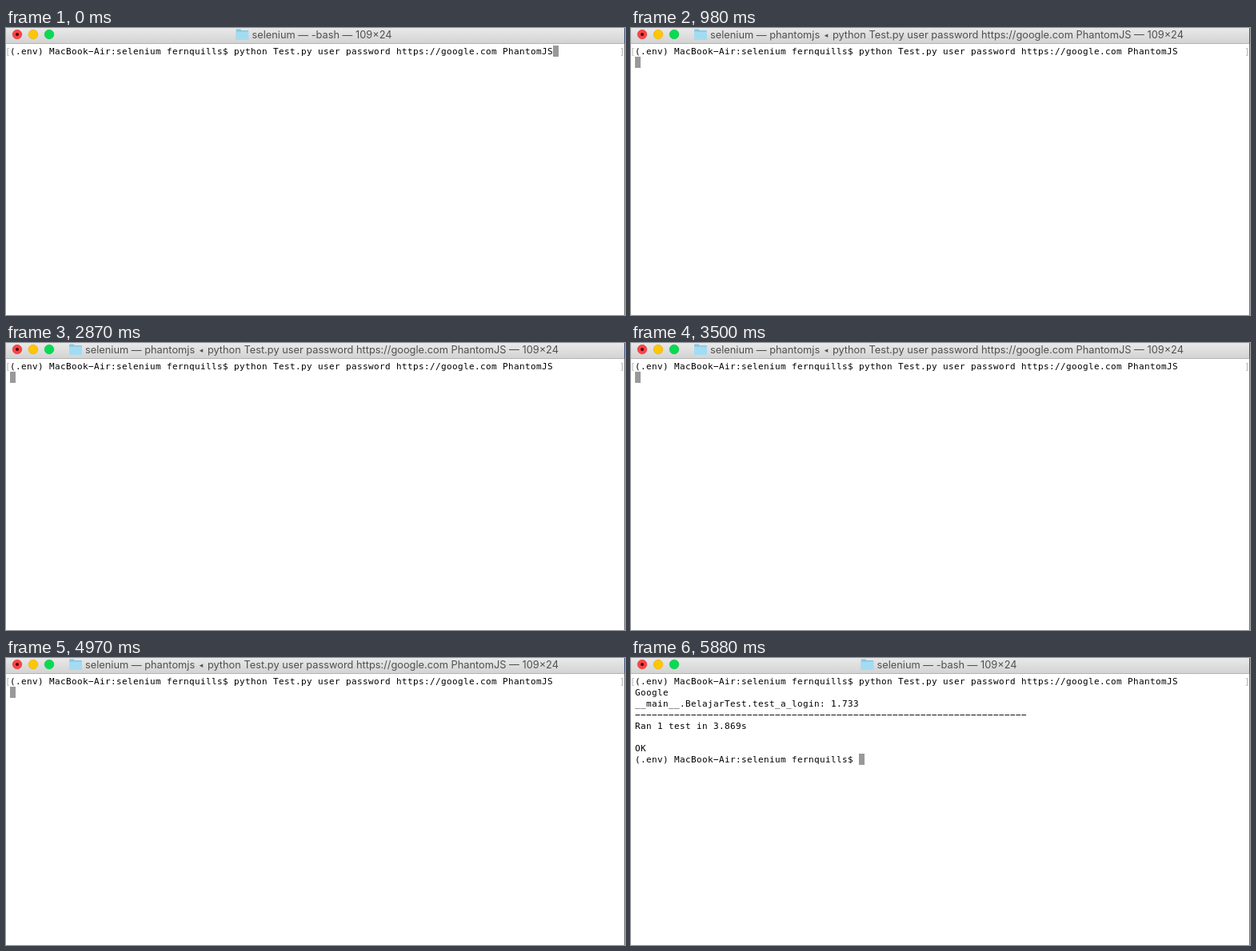
Animation of 774 by 360 pixels, one loop 6.02 s. Source, as an HTML page:

```html
<!DOCTYPE html>
<html lang="en">
<head>
<meta charset="utf-8">
<title>Terminal test run</title>
<style>
  html, body { margin: 0; width: 100%; height: 100%; overflow: hidden; background: #fff; }
  #stage { position: relative; width: 774px; height: 360px; overflow: hidden; background: #fff; }
  #stage div, #stage span, #stage svg { position: absolute; }
  #bar {
    left: 0; top: 0; width: 774px; height: 19px;
    background: linear-gradient(#e9e9e9, #d3d3d3);
    border-bottom: 1px solid #b4b4b4;
  }
  #stage #title {
    left: 385px; top: 0; padding-left: 20px; transform: translateX(-50%);
    font: 12.8px/17px Inter, sans-serif; color: #505050; white-space: pre;
  }
  #title svg { left: 0; top: 1px; }
  #stage #title b { position: static; margin: 0 2px; font: 9px/1 "DejaVu Sans", sans-serif; vertical-align: 1px; }
  #stage #caption { position: static; }
  .row, .mark {
    font: 11px/14px "DejaVu Sans Mono", monospace; letter-spacing: .378px;
    height: 14px; margin-top: 1px; white-space: pre; color: #000;
  }
  .row { left: 5px; }
  .mark { top: 22px; color: #b0b0b0; }
  #cursor { width: 7px; height: 14px; background: #999; }
  #edge { right: 0; top: 0; width: 1px; height: 360px; background: linear-gradient(#46557e 18px, #737373 20px); }
</style>
</head>
<body>
<div id="stage">
  <div id="bar">
    <svg width="70" height="19" style="left:0;top:0">
      <g stroke-width=".6">
        <circle cx="14" cy="8" r="5.8" fill="#fc4345" stroke="#de3537"/>
        <circle cx="34" cy="8" r="5.8" fill="#ffc608" stroke="#e2a900"/>
        <circle cx="54" cy="8" r="5.8" fill="#08db52" stroke="#10b944"/>
      </g>
      <circle cx="14" cy="8" r="2" fill="#4d0003"/>
    </svg>
    <div id="title"><svg width="16" height="15">
      <path d="M0 1.5Q0 .5 1 .5H5.5L7 2H15Q16 2 16 3V13Q16 14 15 14H1Q0 14 0 13Z" fill="#86c7e2"/>
      <path d="M0 3.5H16V13Q16 14 15 14H1Q0 14 0 13Z" fill="#a3dcf2"/>
    </svg><span id="caption"></span></div>
  </div>
  <div id="screen"></div>
  <div id="cursor"></div>
  <span class="mark" style="left:-1px">[</span>
  <span class="mark" style="left:767px">]</span>
  <div id="edge"></div>
</div>
<script>
  const LOOP = 6020, CELL = 7, LINE = 14, LEFT = 5, TOP = 22;
  const $ = id => document.getElementById(id);

  // Minus signs give the wide hyphens of the terminal face.
  const prompt = '(.env) MacBook−Air:selenium fernquills$ ';
  const args = 'python Test.py user password https://google.com PhantomJS';
  const command = prompt + args;
  const report = [
    command,
    'Google',
    '__main__.BelajarTest.test_a_login: 1.733',
    '−'.repeat(70),
    'Ran 1 test in 3.869s',
    '',
    'OK',
    prompt
  ];

  const steps = [
    { at: 0,    job: '-bash', lines: [command] },
    { at: 70,   job: '-bash', lines: [command, ''] },
    { at: 140,  job: args, lines: [command, ''] },
    { at: 980,  job: 'phantomjs <b>◂</b> ' + args, lines: [command, ''] },
    { at: 5040, job: 'python', lines: report },
    { at: 5110, job: '-bash', lines: report }
  ];

  function show({ job, lines }) {
    $('caption').innerHTML = `selenium — ${job} — 109×24`;
    $('screen').innerHTML = lines
      .map((text, i) => `<div class="row" style="top:${TOP + i * LINE}px">${text}</div>`)
      .join('');
    const last = lines.length - 1;
    $('cursor').style.left = LEFT + lines[last].length * CELL + 'px';
    $('cursor').style.top = TOP + last * LINE + 'px';
  }

  let current;
  function tick() {
    const time = performance.now() % LOOP;
    const step = steps.findLast(s => s.at <= time);
    if (step !== current) show(current = step);
    requestAnimationFrame(tick);
  }
  tick();
</script>
</body>
</html>
```
